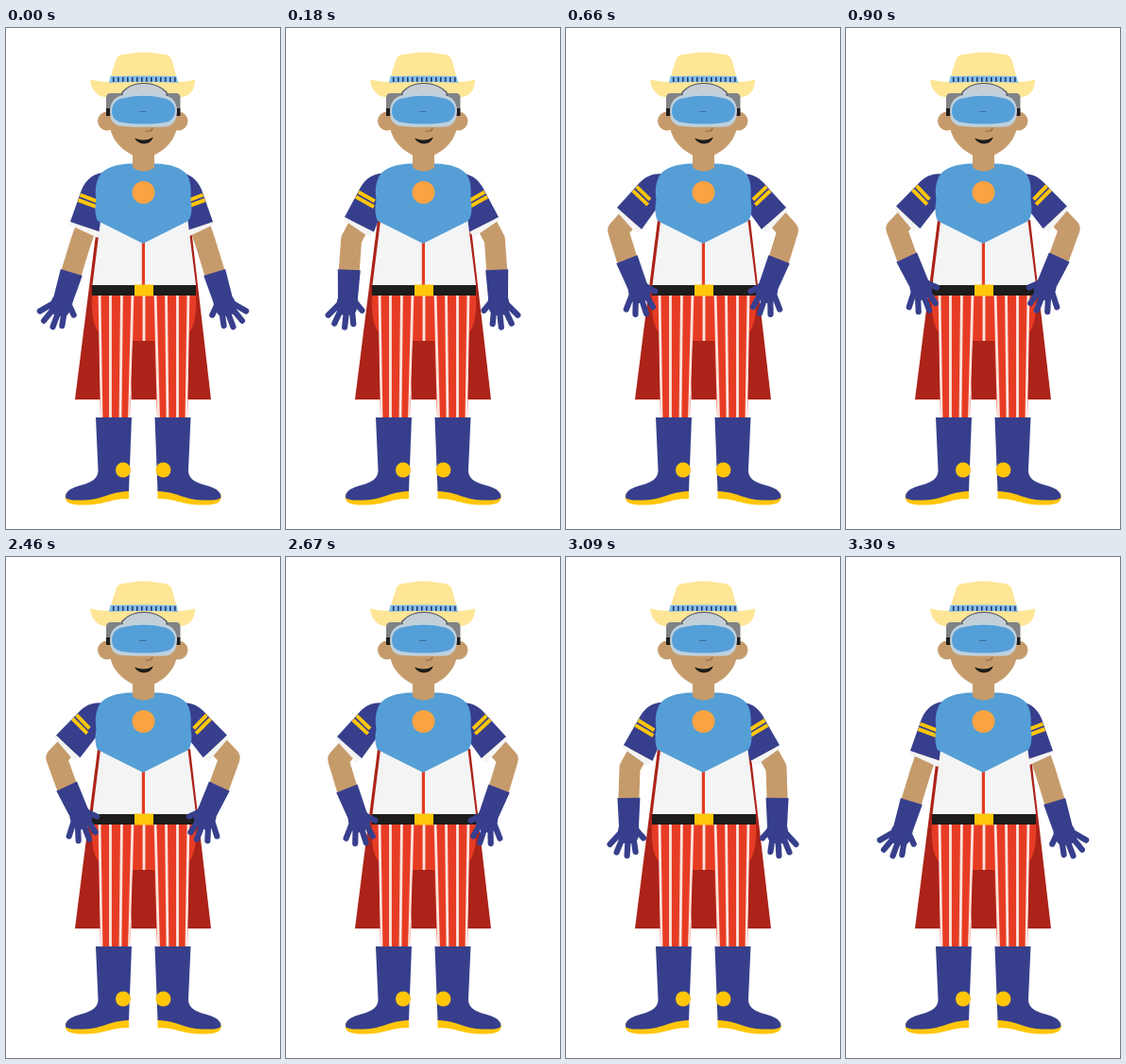
These frames come from a looping animation (290 by 530 pixels, 3.6 s). An HTML page:

```html
<!DOCTYPE html>
<html>
<head>
<meta charset="utf-8">
<style>
  html, body { margin: 0; width: 100%; height: 100%; overflow: hidden; background: #fff; }
  svg { display: block; width: 290px; height: 530px; }
  .navy { fill: #373f8d; }
  .gold { fill: #ffc60a; }
  .red { fill: #e73c24; }
  .white { fill: #f4f4f4; }
  .skin { fill: #c69b6b; }
  .ink { fill: #1d1d1b; }
  .line { fill: none; stroke-linecap: round; }
  .stripe { stroke: #f9e4de; stroke-width: 2.8; }
</style>
</head>
<body>
<svg viewBox="0 0 290 530">
  <defs>
    <clipPath id="pants">
      <path d="M91 282H201C202 300 200 314 194 322L192 412H160L157 331H134L131 412H100L98 322C92 314 90 300 91 282Z"/>
    </clipPath>
  </defs>

  <!-- cape -->
  <path fill="#ac2319" d="M97 203H195L217 393H73Z"/>
  <path fill="#fff" d="M100 385L98.500 322H100L102 394H100ZM131.500 394L133 370L132.500 394Z"/>

  <!-- arms behind the body -->
  <path id="skin" fill="none" stroke="#c69b6b" stroke-width="22" stroke-linejoin="round"/>
  <use href="#skin" transform="translate(290) scale(-1 1)"/>
  <g id="sleeve">
    <path class="white" d="M219 205L220 208L190 222L186 216Z"/>
    <path class="navy" d="M180 153C192 152 202 159 207 171L219 205L186 216L180 190Z"/>
    <path d="M190 183.700L208.500 176.500M190 189.600L210.500 182" stroke="#ffc60a" stroke-width="4"/>
  </g>
  <use href="#sleeve" transform="translate(287) scale(-1 1)"/>

  <!-- trousers -->
  <g clip-path="url(#pants)">
    <path class="red" d="M85 280H205V414H85Z"/>
    <path id="stripes" class="stripe" d="M99 280L101 412M110.500 280V412M122.500 280L121 412M134 280L130.500 412"/>
    <use href="#stripes" transform="translate(292) scale(-1 1)"/>
    <path class="stripe" d="M146 280V332"/>
  </g>

  <!-- boots -->
  <g id="boot">
    <path class="gold" d="M63 495C62 502 68 504.500 80 504.500C106 505 108 498 130 498V487L63 493Z"/>
    <path class="navy" d="M95 412H133L130 490C108 491 103 499 82 499.500C72 500 63 499 63 496C63 489 71 486 80 483.500C92 480 97.500 476 97.500 468Z"/>
    <circle class="gold" cx="124" cy="467.500" r="8"/>
  </g>
  <use href="#boot" transform="translate(290.500) scale(-1 1)"/>

  <!-- torso -->
  <path class="white" d="M101 196H191.500L201 272H91.500Z"/>
  <path class="red" d="M143.800 224H147V272H143.800Z"/>
  <path fill="#559ed6" d="M131 143.500H160C172 144 187 147 192.500 157C196 164 196 172 195.500 182C197 190 197 198 193 204L145 228L97 204C94 198 94 190 95.500 182C94 172 95 164 98.500 157C104 147 119 144 131 143.500Z"/>
  <circle fill="#f9a342" cx="145.500" cy="174" r="12"/>
  <path class="ink" d="M91 272H201V283H91Z"/>
  <path class="gold" d="M136 271.500H156V283.500H136Z"/>

  <!-- head -->
  <path class="skin" d="M134 128H157V148Q145.500 155 134 148Z"/>
  <circle class="skin" cx="107" cy="98.500" r="10"/>
  <circle class="skin" cx="182.500" cy="98.500" r="10"/>
  <path class="skin" d="M110 70H181V104C179 123 159 137 145.500 137S112 123 110 104Z"/>
  <path class="line" stroke="#9d744b" stroke-width="1.300" d="M148 109Q154 110 155 106"/>
  <path class="ink" d="M136 116.500Q147 121 156 115.500Q153 122.500 146 122.500Q139 122 136 116.500Z"/>

  <!-- hat -->
  <path fill="#ffe596" d="M109 57L116.500 34C118 29 121 28 128 27.500C134 27 138 25.500 146 25.500S158 27 164 27.500C170 28 174 29 175.500 34L182 57C190 57 196 56 200 54.500C200 65 195 72 186 73H104C96 72 90 65 89 54.500C95 56 102 57 109 57Z"/>
  <path fill="#7fbdea" d="M110.500 51Q145.500 50 180.500 51L182 58Q145.500 56 109 58Z"/>
  <path stroke="#2d3970" stroke-width="5" stroke-dasharray="1.600 3.400" d="M113 54.400H180"/>

  <!-- headset -->
  <path fill="#808285" d="M106 86V74Q106 69 111 69H180Q184.500 69 184.500 74V86Z"/>
  <path class="ink" d="M106 85H111V93H106ZM180 85H184.500V93H180Z"/>
  <path fill="#c5ced7" stroke="#484e58" stroke-width="1.200" d="M123 73V68C129 61 136 58.500 146 58.500S163 61 170 68V73Z"/>
  <path fill="#bed0de" d="M125 71C137 68 154 68 166 71C176 72 180 78 181 86C181 97 178 104 168 104.500C158 105 134 105 123 104C113 103 110 97 110 87C111 78 115 72 125 71Z"/>
  <path fill="#559fd8" d="M126 74C138 71 154 71 165 74C174 75 178 80 179 86C179 95 175 99 167 100C156 102 135 102 124 100C115 99 112 94 112 87C113 79 117 75 126 74Z"/>
  <path class="line" stroke="#3f6f99" stroke-width="1.200" d="M141.500 88.500H148"/>

  <!-- hands in front -->
  <g id="glove">
    <path class="navy" d="M-12 -1H12L10.500 29C13 36 11 45 8 47H-6C-10 44 -12 37 -10.500 29Z"/>
    <path class="line" stroke="#373f8d" stroke-width="6.200" d="M-7 32L-15.500 41.500M-5 42L-7 56M1 44L2 60M7 42L13 56.500M8 35L20 48"/>
  </g>
  <use href="#glove" transform="translate(290) scale(-1 1)"/>
</svg>
<script>
  const LOOP = 3600, STEP = 30, RISE = 900, FALL = 2430, REST = 3300;
  const shoulder = [189, 163];
  const part = id => document.getElementById(id);
  const skin = part('skin'), sleeve = part('sleeve'), glove = part('glove');

  // Angles are measured outwards from straight down.
  const reach = ([x, y], length, deg) => {
    const a = deg * Math.PI / 180;
    return [x + length * Math.sin(a), y + length * Math.cos(a)];
  };
  const ease = u => 1 - (1 - u) ** 1.9;

  function progress(t) {
    if (t < RISE) return ease(t / RISE);
    if (t < FALL) return 1;
    return ease(Math.max(0, (REST - t) / (REST - FALL)));
  }

  function draw(now) {
    const p = progress(Math.floor(now % LOOP / STEP) * STEP);
    const elbow = reach(shoulder, 68.6, 19 + 25 * p);
    const wrist = reach(elbow, 33, 17 - 37 * p);
    skin.setAttribute('d', `M${shoulder}L${elbow}L${wrist}`);
    sleeve.setAttribute('transform', `rotate(${-25 * p} ${shoulder})`);
    glove.setAttribute('transform', `translate(${wrist}) rotate(${42 * p - 17})`);
  }

  const start = performance.now();
  function tick() {
    draw(performance.now() - start);
    requestAnimationFrame(tick);
  }
  tick();
</script>
</body>
</html>
```
